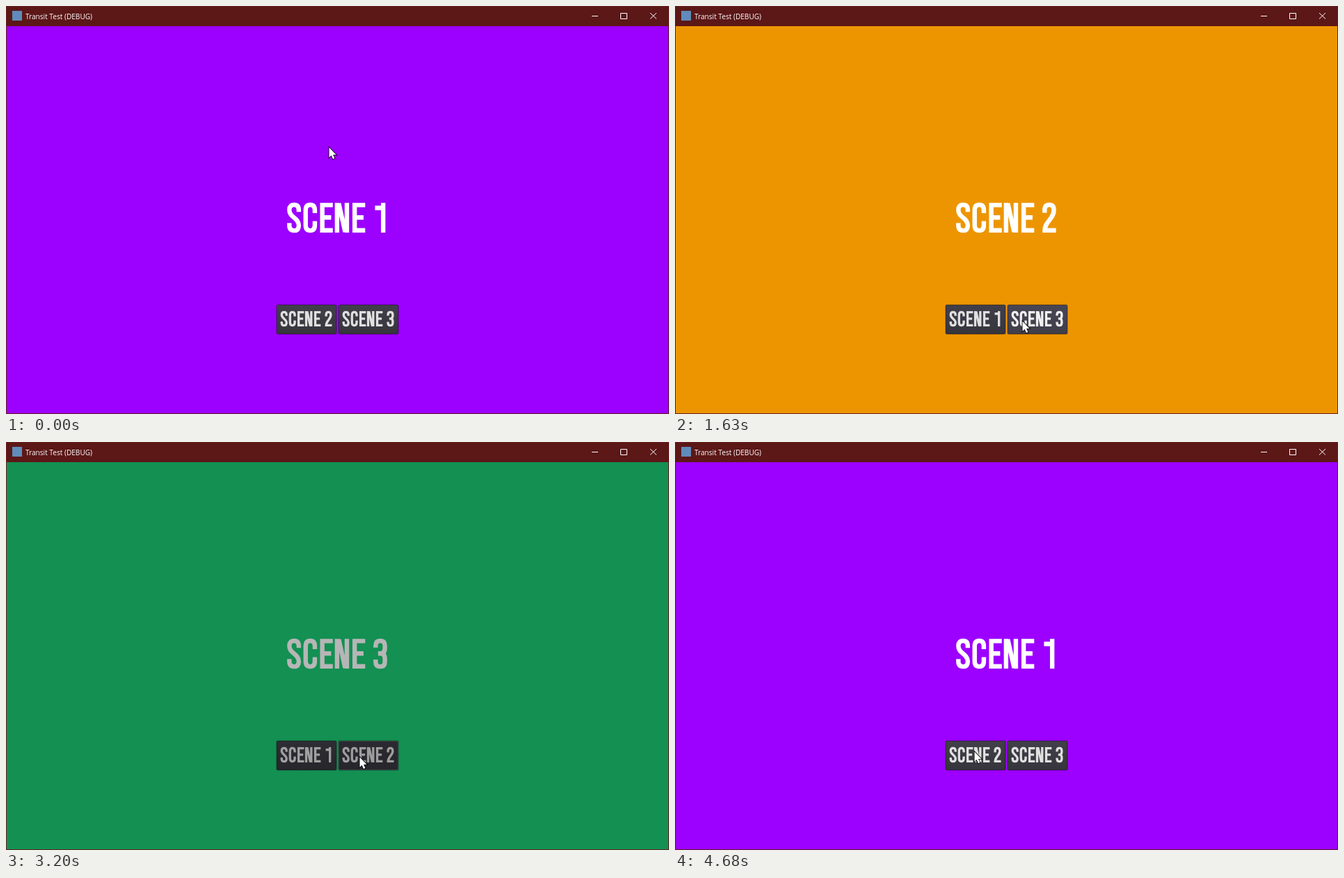
Write an HTML page with a canvas that moves like this. It is 953 px wide and 587 px high and loops after 5000 ms.

```html
<!DOCTYPE html>
<html lang="en">
<head>
<meta charset="utf-8">
<title>Transit Test</title>
<style>
  html, body { margin: 0; width: 100%; height: 100%; overflow: hidden; background: #5c1717; }
  canvas { display: block; }
</style>
</head>
<body>
<canvas id="stage" width="953" height="587" role="img" aria-label="Transit Test: fading between Scene 1, Scene 2 and Scene 3"></canvas>
<script>
const ctx = document.getElementById('stage').getContext('2d');

const LOOP = 5000, TICK = 78.4, HALF = 240;
const COLORS = ['#9c00ff', '#ed9500', '#1bc973'];

// Each fade leaves one scene for the next; hover only wakes once the mouse moves again.
const FADES = [
  { start: 932, to: 1, button: 0, wake: 1470 },
  { start: 1965, to: 2, button: 1, wake: 2720 },
  { start: 3113, to: 1, button: 1, wake: 3660 },
  { start: 4203, to: 0, button: 0, wake: LOOP }
];

const smooth = p => p * p * (3 - 2 * p);
const easeOut = p => 1 - (1 - p) ** 2;
const clamp = p => Math.max(0, Math.min(1, p));

const MOVES = [
  { from: 62, until: 608, x: 454, y: 450, ease: smooth },
  { from: 1395, until: 1790, x: 508, y: 453, ease: easeOut },
  { from: 3590, until: 3830, x: 430, y: 445, ease: easeOut }
];

// Condensed display letters: [advance, centre line], cap height 700.
const GLYPHS = {
  S: [376, 'M299 212V173Q299 45 188 45Q77 45 77 168C77 350 299 350 299 532Q299 655 188 655Q77 655 77 531V478'],
  C: [384, 'M301 242V173Q301 45 193 45Q85 45 85 173V527Q85 655 193 655Q301 655 301 527V432'],
  E: [350, 'M341 52H93V648H341M93 345H302'],
  N: [413, 'M91 700V0M322 0V700M131 12L282 688'],
  ' ': [160, ''],
  1: [380, 'M255 0V700M62 120H215'],
  2: [380, 'M77 235V173Q77 45 186 45Q295 45 295 173C295 380 80 440 80 648H345'],
  3: [380, 'M77 205V160Q77 45 186 45Q295 45 295 160V215Q295 345 190 345H135M190 345Q295 345 295 470V540Q295 655 186 655Q77 655 77 540V490']
};
for (const g of Object.values(GLYPHS)) g[1] = new Path2D(g[1]);
const ARROW = new Path2D('M.5 .5V15L3.6 12 6 17.2 8.4 16.1 6.1 11H10.6Z');

function write(text, center, top, scale, color) {
  const letters = [...text].map(c => GLYPHS[c]);
  const width = letters.reduce((sum, [advance]) => sum + advance, 0);
  ctx.save();
  ctx.translate(center - width * scale / 2, top);
  ctx.scale(scale, scale);
  ctx.lineWidth = 105;
  ctx.strokeStyle = color;
  for (const [advance, path] of letters) {
    ctx.stroke(path);
    ctx.translate(advance, 0);
  }
  ctx.restore();
}

function rect(x, y, w, h, color) {
  ctx.fillStyle = color;
  ctx.fillRect(x, y, w, h);
}

function box(x, y, w, h, r) {
  ctx.beginPath();
  ctx.roundRect(x, y, w, h, r);
}

const STYLES = {
  normal: ['#423f4a', '#36353c', '#e0e0e0'],
  hover: ['#494653', '#403e49', '#f0f0f0'],
  clicked: ['#3c3a44', '#37353e', '#dcdcdc']
};

function button(x, label, state) {
  const [top, bottom, ink] = STYLES[state];
  box(x - 1, 429, 88, 44, 3);
  ctx.fillStyle = 'rgba(0,0,0,.22)';
  ctx.fill();
  const shade = ctx.createLinearGradient(0, 430, 0, 472);
  shade.addColorStop(0, top);
  shade.addColorStop(1, bottom);
  box(x, 430, 86, 42, 2);
  ctx.fillStyle = shade;
  ctx.fill();
  box(x + .5, 430.5, 85, 41, 2);
  ctx.lineWidth = 1;
  ctx.strokeStyle = state === 'clicked' ? 'rgba(255,255,255,.14)' : 'rgba(0,0,0,.2)';
  ctx.stroke();
  write(label, x + 42.7, 439, .0314, ink);
}

function titleBar() {
  rect(0, 0, 953, 587, '#642020');
  rect(1, 1, 951, 28, '#5c1717');
  rect(9, 7, 14, 14, '#5f8cba');
  ctx.fillStyle = '#fff';
  ctx.font = '10.1px "Open Sans", "Noto Sans", sans-serif';
  ctx.fillText('Transit Test (DEBUG)', 28, 18.5);
  ctx.lineWidth = 1;
  ctx.strokeStyle = '#fff';
  ctx.stroke(new Path2D('M842 14.5H851M883.5 10.5H892.5V18.5H883.5ZM926 10L935 18.5M935 10L926 18.5'));
}

function cursorAt(time) {
  let x = 464, y = 203;
  for (const m of MOVES) {
    const p = m.ease(clamp((time - m.from) / (m.until - m.from)));
    x += (m.x - x) * p;
    y += (m.y - y) * p;
  }
  return [Math.round(x), Math.round(y)];
}

function sceneAt(time) {
  let scene = 0, wake = 0, light = 1, clicked = -1;
  for (const f of FADES) {
    const t = time - f.start;
    if (t >= HALF) {
      scene = f.to;
      wake = f.wake;
    }
    if (t > 0 && t < 2 * HALF) {
      light = smooth(Math.abs(t - HALF) / HALF);
      if (t < HALF) clicked = f.button;
    }
  }
  return { scene, wake, light, clicked };
}

function draw(time) {
  const { scene, wake, light, clicked } = sceneAt(time);
  const [x, y] = cursorAt(time);
  titleBar();
  rect(1, 29, 951, 557, COLORS[scene]);
  write(`SCENE ${scene + 1}`, 476.2, 283.2, .061, '#fff');
  [0, 1, 2].filter(n => n !== scene).forEach((n, i) => {
    const left = 389 + 89 * i;
    const over = time >= wake && y >= 430 && x >= left && x < left + 86;
    button(left, `SCENE ${n + 1}`, clicked === i ? 'clicked' : over ? 'hover' : 'normal');
  });
  rect(1, 29, 951, 557, `rgba(0,0,0,${1 - light})`);

  ctx.save();
  ctx.translate(x, y);
  ctx.lineWidth = 1.6;
  ctx.strokeStyle = '#000';
  ctx.stroke(ARROW);
  ctx.fillStyle = '#fff';
  ctx.fill(ARROW);
  ctx.restore();
}

function frame() {
  const time = performance.now() % LOOP;
  draw(140 + TICK * Math.floor((time - 140) / TICK + .1));
  requestAnimationFrame(frame);
}
frame();
</script>
</body>
</html>
```
